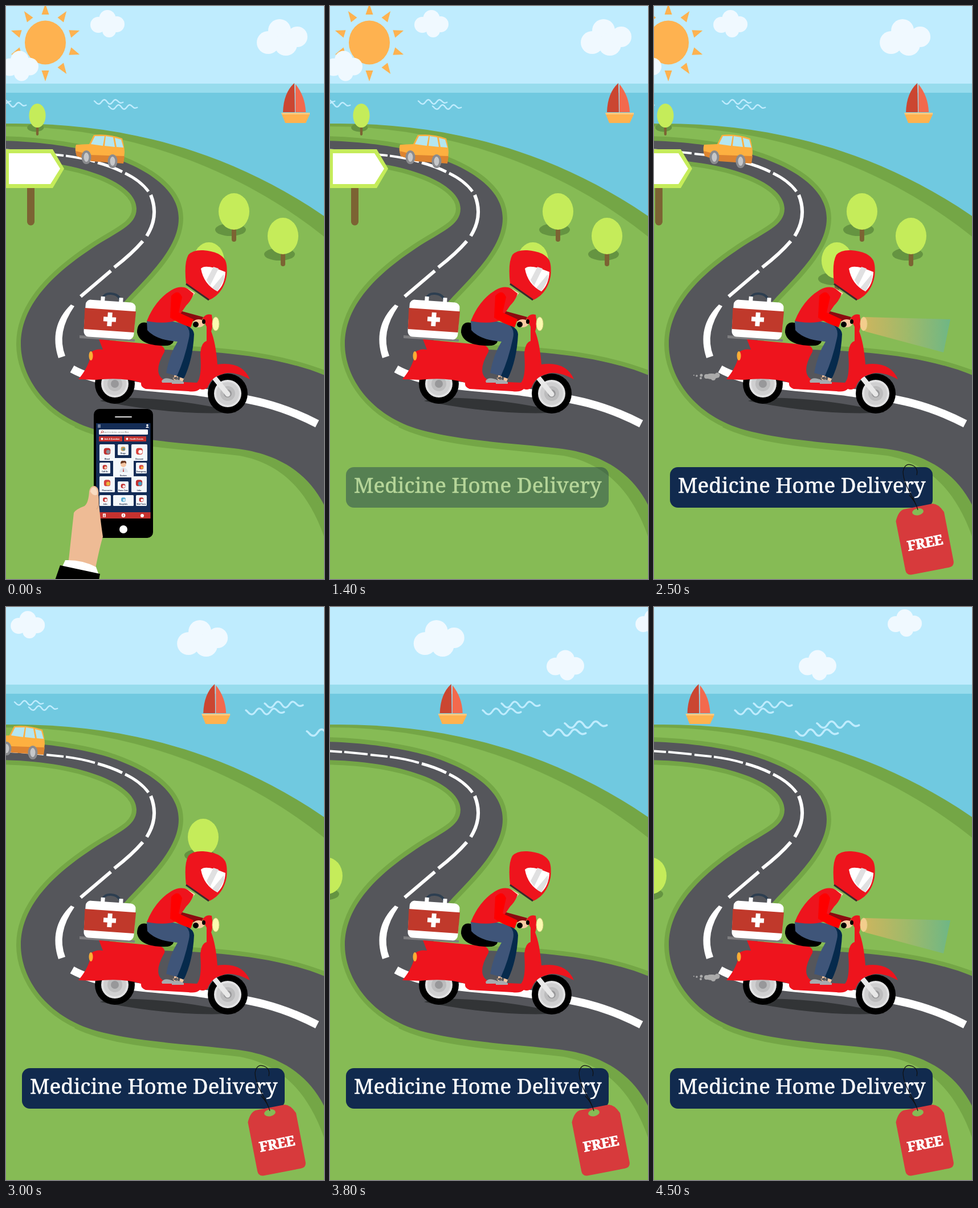
An HTML page for the animation above (8000 ms loop, 558 by 1004 pixels).

```html
<!DOCTYPE html>
<html lang="en">
<head>
<meta charset="utf-8">
<title>Medicine Home Delivery</title>
<style>
  html, body { margin: 0; width: 100%; height: 100%; overflow: hidden; }
  svg { display: block; width: 100vw; height: 100vh; }
  text { fill: #fff; font-family: "Noto Serif", serif; }
  .tiny { font: 600 3.4px Roboto, sans-serif; text-anchor: middle; }
  .wave { fill: none; stroke: #bfecfe; stroke-width: 3.2; stroke-linecap: round; }
</style>
</head>
<body>
<svg viewBox="0 0 558 1004" preserveAspectRatio="none">
  <defs>
    <linearGradient id="beamFill">
      <stop stop-color="#e9b363" stop-opacity=".7"/>
      <stop offset=".5" stop-color="#a9b973" stop-opacity=".7"/>
      <stop offset="1" stop-color="#66b596" stop-opacity=".75"/>
    </linearGradient>
    <g id="puff" fill="#f0f9ff">
      <circle cy="-9.5" r="14.5"/><circle cx="-16" cy="2" r="14"/>
      <circle cx="16" cy="1" r="14"/><circle cx="3" cy="12" r="12"/>
    </g>
    <path id="ripple" d="M0-2C4 0 5 6 11 5S18-6 24-5S31 6 37 5S44-6 50-5S57 6 67 1"/>
    <g id="tree">
      <ellipse cx="-6" cy="32" rx="27" ry="11" fill="#659441"/>
      <path d="M0 28V49" stroke="#7c6333" stroke-width="8" stroke-linecap="round"/>
      <ellipse rx="27" ry="32" fill="#c5ec5a"/>
    </g>
    <g id="wheel">
      <circle r="35"/><circle r="24" fill="#e2e2e3"/>
      <circle r="20" fill="#cfcfd0"/><circle r="13" fill="#bcbcbd"/><circle r="7" fill="#98989a"/>
    </g>
  </defs>

  <rect width="558" height="137" fill="#bfecfe"/>
  <rect y="136" width="558" height="17" fill="#97dced"/>
  <rect y="152" width="558" height="260" fill="#70c9e0"/>

  <g class="far">
    <g id="sun" transform="translate(69 64)" fill="#feb250"><ellipse rx="36" ry="38.5"/></g>
    <use href="#puff" transform="translate(24 105) scale(1.1)"/>
    <use href="#puff" x="178" y="31"/>
  </g>
  <g class="far" id="bigCloud" fill="#f0f9ff">
    <circle cx="460" cy="64" r="20"/><circle cx="480" cy="43" r="20"/>
    <circle cx="491" cy="67" r="20"/><circle cx="511" cy="54" r="18"/>
  </g>
  <g class="late"><use href="#puff" x="440" y="28"/></g>
  <g id="lastCloud"><use href="#puff" transform="translate(287 102) scale(1.1)"/></g>

  <g class="near wave">
    <use href="#ripple" transform="translate(-42 166) scale(.75)"/>
    <use href="#ripple" transform="translate(-15 173) scale(.75)"/>
    <use href="#ripple" transform="translate(155 168) scale(.75)"/>
    <use href="#ripple" transform="translate(180 177) scale(.75)"/>
  </g>
  <g class="late wave">
    <use href="#ripple" x="175" y="171"/><use href="#ripple" x="142" y="183"/>
    <use href="#ripple" transform="translate(286 206) scale(1.1)"/>
    <use href="#ripple" transform="translate(249 220) scale(1.1)"/>
  </g>
  <g class="far">
    <path d="M506 135Q487 152 486 186H507Z" fill="#cb4631"/>
    <path d="M508 137Q525 158 526 186H508Z" fill="#f3694d"/>
    <path d="M507.500 137V187" stroke="#a5dcec"/>
    <path d="M484 190H533L526 205H490Z" fill="#ffb24f"/>
    <path d="M483 187H533V190H484Z" fill="#fdc97f"/>
  </g>

  <!-- land and road -->
  <path d="M0 206C215 203 400 260 558 368V1004H0Z" fill="#74a646"/>
  <path d="M0 211C200 211 400 278 558 404V1004H0Z" fill="#86bb55"/>
  <path d="M578 1004C550 860 490 803 410 788C300 775 190 772 120 738L150 700L578 780Z" fill="#74a646"/>
  <path d="M-20 236C60 236 150 250 200 270C262 294 303 328 303 372C303 420 258 465 215 510C180 548 160 590 205 600C300 604 460 600 578 655L578 930C555 830 490 785 400 775C330 767 230 762 160 743C70 718 26 650 26 592C26 520 90 465 150 425C195 395 229 385 229 355C229 310 130 268-20 268Z"
    fill="#55565b" stroke="#74a646" stroke-width="16" paint-order="stroke"/>
  <g fill="none" stroke="#fff">
    <path d="M0 252.500L21 254M25 254L66 258M71 259L101 262M105 262.500Q132 266 156 273" stroke-width="4"/>
    <path d="M161 274.500Q185 281 204 290.500M209 293Q236 306 250 325" stroke-width="5"/>
    <path d="M254 331Q269 368 247 403M240 412Q221 434 190 458M184 464L131 509" stroke-width="6"/>
    <path d="M116 636C180 672 300 668 350 678C430 688 480 698 546 732" stroke-width="14"/>
  </g>
  <path d="M114 523Q74 562 92 617L104 613Q88 572 120 526Z" fill="#fff"/>

  <g class="near">
    <use href="#tree" transform="translate(55 192) scale(.54 .66)"/>
    <path d="M43.500 310V378" stroke="#7c6333" stroke-width="13" stroke-linecap="round"/>
    <path d="M-1 251H82L102 285L82 319H-1Z" fill="#c5ec5a"/>
    <path d="M5 258H78L95 285L78 312H5Z" fill="#fff"/>
  </g>
  <g id="car">
    <path d="M123 244L146 243L154 227Q178 224 204 233Q208 248 208 258L206 275L150 271L124 263Q120 252 123 244Z" fill="#fdb040"/>
    <path d="M122 255L150 262L208 264L206 277L150 273L124 264Z" fill="#dd8430"/>
    <path d="M156 229L173 229L170 246L149 243ZM175 229L188 231L191 248L173 246ZM191 232L202 235L206 249L194 248Z" fill="#b4e6f0"/>
    <g fill="#c6c7c9" stroke="#8a8b8e" stroke-width="4">
      <ellipse cx="141" cy="266" rx="6.500" ry="10"/><ellipse cx="187" cy="273" rx="6.500" ry="10"/>
    </g>
  </g>
  <g class="near" id="firstTrees">
    <use href="#tree" x="400" y="360"/><use href="#tree" x="356" y="446"/>
  </g>
  <use href="#tree" id="lastTree"/>

  <!-- scooter and rider -->
  <g id="lights">
    <path d="M370 545L520 549L508 607L370 570Z" fill="url(#beamFill)"/>
    <g fill="#aaa">
      <ellipse cx="101" cy="649" rx="11" ry="5"/><circle cx="92" cy="649" r="4"/><circle cx="111" cy="647" r="4.500"/>
      <circle cx="104" cy="652" r="4"/><circle cx="83" cy="647" r="2.500"/><circle cx="82" cy="652" r="2"/>
      <circle cx="75" cy="648" r="1.700"/><circle cx="70" cy="647" r="1"/>
    </g>
  </g>
  <path d="M165 692C200 680 320 690 405 712Q300 719 165 692Z" fill="#323436"/>
  <use href="#wheel" x="191" y="662"/>
  <use href="#wheel" x="389" y="679"/>
  <path d="M367 653L389 680" stroke="#e8e8e8" stroke-width="9" stroke-linecap="round"/>
  <path d="M129 577L226 584V588L129 582Z" fill="#7e7e80"/>
  <path d="M163 584L270 594Q280 598 278 606Q264 630 268 644Q272 657 290 658L335 660Q344 650 341 610Q342 590 352 587V562L345 548Q350 538 361 541Q364 560 360 570Q368 590 371 628Q414 622 428 654Q396 638 380 645Q360 650 354 668Q348 674 340 671Q334 677 320 675L245 671Q236 668 237 660Q205 650 158 655L127 654Q146 632 150 606Q158 600 170 602Z" fill="#ee141d"/>
  <ellipse cx="149" cy="613" rx="3.500" ry="8" fill="#fbad35"/>
  <path d="M169 517Q170 503 184 504Q200 505 201 519" fill="none" stroke="#2d3e50" stroke-width="4"/>
  <g transform="translate(182 549) rotate(4)">
    <rect x="-44" y="-32" width="88" height="65" rx="9" fill="#fff"/>
    <path d="M-18-39h7v8h-7zM14-39h7v8h-7z" fill="#fff"/>
    <path d="M-45-17H45L44 20H-44Z" fill="#c0392b"/>
    <path d="M0-12V12M-11 0H11" stroke="#fff" stroke-width="8"/>
  </g>
  <path d="M230 572Q230 552 247 555L258 572Q290 576 294 588Q291 597 270 595Q234 593 230 572Z"/>
  <path d="M292 652L301 656L300 649ZM296 643L303 646L299 657L294 655ZM306 648L313 651L309 660L304 658Z" fill="#f6c6a0"/>
  <path d="M290 556Q328 556 330 575Q328 620 312 653L299 648Q306 610 306 580Z" fill="#062a4c"/>
  <path d="M247 552Q285 548 312 558Q325 564 321 582Q313 620 300 648L281 643Q287 610 301 588Q264 586 248 568Z" fill="#3f5579"/>
  <path d="M273 657Q278 648 295 656L294 660H274ZM291 660Q297 650 312 659V662H291Z" fill="#a8abae"/>
  <path d="M302 533L346 545L342 554L312 549Z" fill="#8b0c10"/>
  <path d="M317 494L332 503L325 511L312 505Z" fill="#f8d2ad"/>
  <path d="M247 552Q262 515 290 498Q306 489 318 495L329 504Q326 515 316 525L298 551Q280 558 247 552Z" fill="#ee141d"/>
  <path d="M290 508Q302 494 309 510L303 537L329 549L324 563Q300 555 288 546Z" fill="#fe0000"/>
  <ellipse cx="338" cy="556" rx="10" ry="7" fill="#f8cba3"/>
  <circle cx="333" cy="558" r="5"/><ellipse cx="347" cy="553" rx="3" ry="4"/>
  <ellipse id="lamp" cx="368" cy="557" rx="6" ry="12" stroke="#dfce83"/>
  <path d="M316 487Q312 450 320 436Q328 427 346 428Q376 430 385 446Q389 456 387 474Q381 504 357 515Z" fill="#ee141d"/>
  <path d="M316 487L356 515" stroke="#3a2b2c" stroke-width="3"/>
  <path d="M342 460Q350 451 385 466Q384 488 371 500Q347 488 342 460Z" fill="#fff"/>
  <path d="M352 480L364 457L373 460L358 490ZM362 494L382 470L383 479L371 500Z" fill="#e0e0e1"/>

  <!-- phone in hand -->
  <g id="phone">
    <rect x="154" y="706" width="104" height="226" rx="10"/>
    <path d="M192 720H220" stroke="#ddd" stroke-width="2" stroke-linecap="round"/>
    <rect x="158" y="731" width="95.500" height="167" fill="#132c56"/>
    <circle cx="206" cy="917" r="7" fill="#fff"/>
    <path d="M161 734H166M161 736H166M161 738H166" stroke="#fff" stroke-width=".8"/>
    <circle cx="248" cy="734.500" r="1.800" fill="#fff"/><path d="M245 739Q248 734 251 739Z" fill="#fff"/>
    <rect x="163" y="742" width="86" height="9" rx="1.500" fill="#fff"/>
    <circle cx="169" cy="746" r="1.700" fill="none" stroke="#c0302f" stroke-width=".8"/><path d="M168 747L166 749" stroke="#c0302f"/>
    <text class="tiny" x="193" y="748" style="fill:#777;font-weight:400;font-size:3px">Search for doctors, services/More</text>
    <g fill="#c5322f">
      <rect x="163" y="754" width="41" height="9" rx="1"/><rect x="207" y="754" width="39" height="9" rx="1"/>
      <rect x="158" y="887" width="95.500" height="11"/>
    </g>
    <text class="tiny" x="186" y="760.300" style="font-size:3.9px">Ask A Question</text>
    <text class="tiny" x="229" y="760.300" style="font-size:3.9px">Health Events</text>
    <g fill="#fff"><circle cx="168.500" cy="758.500" r="2"/><circle cx="212.500" cy="758.500" r="2"/>
      <path d="M170 889.500h5v6h-5z"/><circle cx="206" cy="892.500" r="3.400"/><circle cx="239" cy="893" r="3"/></g>
    <path d="M171 892h3M171 894h3M206 890.500v4" stroke="#b9332f"/>
    <g id="tiles"></g>
    <circle cx="206" cy="803" r="5" fill="#f5c6a2"/><path d="M201 802Q201 796 206 797Q212 796 211 802L208 800Z" fill="#6b3a22"/>
    <path d="M199 817Q200 809 206 809Q213 809 214 817Z" fill="#dfe8ee"/><path d="M206 809L205 816H207Z" fill="#c0302f"/>
    <path d="M109 980L119 888Q122 882 138 876Q145 870 146 850Q148 840 156 841Q164 844 162 858Q164 890 170 930Q165 945 156 990Z" fill="#eebb95"/>
    <path d="M148 851Q149 843 155 843Q161 845 160 856Q154 860 148 851Z" fill="#f9dcc2"/>
    <path d="M162 858Q164 876 159 882" fill="none" stroke="#d9a67c"/>
    <path d="M104 971Q134 970 158 983L163 997L98 984Z" fill="#fff"/>
    <path d="M95 980L165 995L163 1006H86Z"/>
  </g>
  <g id="finger">
    <path d="M226 925Q228 916 237 920Q241 928 246 961Q260 958 275 966Q296 970 300 988L306 1125H228L222 1005Q214 972 222 966Q230 963 231 988L236 990Z" fill="#eebb95"/>
    <path d="M228 924Q230 919 236 921Q240 926 238 930Q231 933 228 924Z" fill="#f9dcc2"/>
    <path d="M246 961L248 974M274 966L276 978" fill="none" stroke="#d9a67c"/>
  </g>

  <g id="banner">
    <rect x="28" y="808" width="461" height="71" rx="14" fill="#112a4e"/>
    <text x="42" y="853" font-size="36.800" stroke="#fff" stroke-width=".5">Medicine Home Delivery</text>
  </g>
  <g id="tag">
    <g transform="translate(474.500 935) rotate(-11)">
      <path d="M-26-59H26Q36-57 43-41V46Q43 56 33 56H-33Q-43 56-43 46V-41Q-36-57-26-59Z" fill="#d73a3c"/>
      <ellipse cy="-50" cx="-2" rx="10" ry="6" fill="#86bb55"/>
      <text y="14" font-size="24" font-weight="900" text-anchor="middle" stroke="#fff">FREE</text>
    </g>
    <path d="M463 883C457 860 438 842 437 816Q440 799 454 805Q464 810 461 822M463 883Q460 870 448 857" fill="none" stroke="#111" stroke-width="1.200"/>
  </g>
</svg>
<script>
const $ = id => document.getElementById(id);

$('sun').innerHTML += Array.from({ length: 10 }, (_, i) =>
  `<path transform="scale(.93 1) rotate(${i * 36})" d="M-7-49L0-68L7-49Z"/>`).join('');

// x, y, width, height, label, icon colours
const tiles = [
  [164, 768, 27, 29, 'Blood', '#c0302f', '#8a8f98'], [196, 768, 19, 19, 'Drugs', '#c99a55', '#5d9290'],
  [220, 768, 28, 29, 'Discount', '#d8413c', '#fff'], [164, 800, 19, 19, 'Call Us', '#c0302f', '#f5c6a2'],
  [188, 792, 36, 34, 'Doctors', '#f4f8fb', '#f4f8fb'], [228, 800, 19, 19, 'Emergency', '#d8413c', '#f0b03f'],
  [164, 824, 27, 28, 'Pharmacies', '#d8413c', '#e9b53e'], [196, 833, 19, 19, 'Home Care', '#c0302f', '#fff'],
  [220, 824, 27, 28, 'Labs', '#c0302f', '#4aa3c4'], [164, 857, 20, 19, 'Jobs', '#c0302f', '#fff'],
  [188, 857, 36, 19, 'Hospitals', '#51a8d0', '#d3e9f4'], [228, 857, 19, 19, 'Med Tests', '#c0302f', '#fff'],
];
$('tiles').innerHTML = tiles.map(([x, y, w, h, label, main, accent]) => {
  const cx = x + w / 2, cy = y + h * .42, r = h * .2;
  return `<rect x="${x}" y="${y}" width="${w}" height="${h}" rx="1.500" fill="#f4f8fb"/>
    <rect x="${cx - r}" y="${cy - r}" width="${r * 2}" height="${r * 2}" rx="${r * .7}" fill="${main}"/>
    <circle cx="${cx + r * .3}" cy="${cy + r * .2}" r="${r * .6}" fill="${accent}"/>
    <text class="tiny" x="${cx}" y="${y + h - 2.5}" style="fill:#2a3550">${label}</text>`;
}).join('');

// Linear interpolation through [time, value] points, held at both ends
function track(t, ...points) {
  if (t <= points[0][0]) return points[0][1];
  for (let i = 1; i < points.length; i++) {
    const [t0, v0] = points[i - 1], [t1, v1] = points[i];
    if (t < t1) return v0 + (v1 - v0) * (t - t0) / (t1 - t0);
  }
  return points.at(-1)[1];
}
const move = (el, x, y = 0) => el.setAttribute('transform', `translate(${x} ${y})`);
const moveAll = (name, x) => document.querySelectorAll('.' + name).forEach(el => move(el, x));
const show = (id, opacity) => $(id).setAttribute('opacity', Number(opacity));

function draw(t) {
  move($('finger'),
    track(t, [0, 3], [600, -54], [700, -54], [900, 0]),
    track(t, [0, 85], [600, -95], [700, -95], [900, 0], [1100, 95]));
  show('finger', t >= 100 && t < 1100);
  move($('phone'), 0, track(t, [1000, 0], [1300, 300]));
  show('banner', track(t, [1200, 0], [1700, 1]));
  show('tag', track(t, [1400, 0], [1800, 1]));

  const near = track(t, [2333, 0], [4500, -455]);
  moveAll('far', track(t, [2271, 0], [4500, -427.5]));
  moveAll('near', near);
  moveAll('late', track(t, [2600, 430], [3000, 279], [3800, 126], [4460, 0]));
  move($('lastCloud'), track(t, [3000, 306], [3800, 126], [4460, 0]));
  move($('car'), near, track(t, [2500, -1], [3000, -18], [3300, -22]));
  move($('lastTree'),
    track(t, [2333, 486], [3000, 346], [3700, -5]),
    track(t, [3000, 403], [3700, 471]));
  show('bigCloud', t < 4000);
  show('firstTrees', t < 2800);

  const lit = t >= 2300 && (t >= 4300 || (t - 2300) % 1000 < 500);
  show('lights', lit);
  $('lamp').setAttribute('fill', lit ? '#f3cd8c' : '#fafab0');
}

function frame(now) {
  draw(Math.floor(now % 8000 / 100) * 100);
  requestAnimationFrame(frame);
}
frame(performance.now());
</script>
</body>
</html>
```
